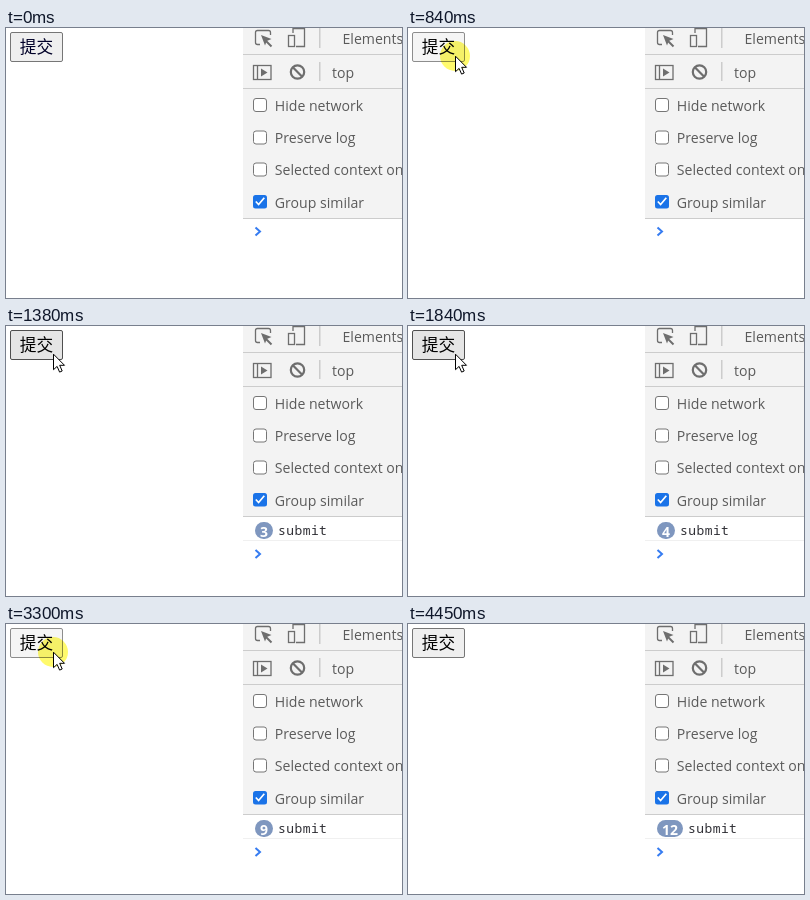
Write an HTML page that moves like this. It is 396 px wide and 270 px high and loops after 4920 ms.

```html
<!DOCTYPE html>
<html lang="zh">
<head>
<meta charset="utf-8">
<title>Submit counter</title>
<style>
  html, body { margin: 0; width: 100%; height: 100%; overflow: hidden; background: #fff; }
  svg { display: block; }
  .ui { font: 14.1px "Open Sans", "Noto Sans", sans-serif; fill: #5a5a5a; }
  .rule { fill: #ccc; }
  .line { fill: none; stroke: #6e6e6e; stroke-width: 1.3; }
  .solid { fill: #6e6e6e; }
  .box { fill: #fff; stroke: #767676; }
  .button rect { fill: #efefef; stroke: #767676; }
  .button text { font: 300 16.7px "Noto Sans CJK SC", "Noto Sans CJK", sans-serif; fill: #000; }
  .idle text { fill: #000028; }
  .hover rect { fill: #e5e5e5; stroke: #4f4f4f; }
  .down rect { fill: #f5f5f5; stroke: #8d8d8d; }
  .badge rect { fill: #7f97bf; }
  .badge text { font: bold 14px "Open Sans", "Noto Sans", sans-serif; fill: #fff; text-anchor: middle; }
  #word { font: 13px "Noto Sans Mono", "DejaVu Sans Mono", monospace; letter-spacing: .42px; fill: #303036; }
  #prompt { fill: none; stroke: #367cf1; stroke-width: 2; }
  #glow { fill: #fffa6c; mix-blend-mode: multiply; }
</style>
</head>
<body>
<svg width="396" height="270" viewBox="0 0 396 270">
  <rect width="396" height="270" fill="#fff"/>

  <g id="button" class="button">
    <rect x="4.5" y="4.5" width="52" height="29" rx="1.5"/>
    <text x="13.8" y="25">提交</text>
  </g>

  <!-- developer tools panel -->
  <rect x="237" width="159" height="190" fill="#f3f3f3"/>
  <g class="rule">
    <rect x="237" y="26" width="159" height="1"/>
    <rect x="237" y="60" width="159" height="1"/>
    <rect x="237" y="190" width="159" height="1"/>
    <rect x="313" y="0" width="1.5" height="20"/>
    <rect x="313" y="34" width="1.5" height="19"/>
  </g>
  <g class="line">
    <path d="M254 16.5H251.5Q249.5 16.5 249.500 14.5V4.500Q249.500 2.500 251.500 2.500H262.500Q264.500 2.500 264.500 4.500V7"/>
    <path d="M259.500 12.500L265.500 18.500" stroke-width="2"/>
    <path d="M287 5V.5H298.500V18.500H290"/>
    <rect x="282.500" y="7.500" width="6" height="11"/>
    <rect x="247.500" y="37.500" width="17.500" height="14"/>
    <path d="M251.500 38V51"/>
    <circle cx="291.500" cy="44" r="6.700" stroke-width="2.200"/>
    <path d="M286.800 39.300L296.200 48.700" stroke-width="2.200"/>
  </g>
  <path class="solid" d="M255 7L265.500 11L260.800 13L259 17.500Z"/>
  <path class="solid" d="M255 40.500L261.500 44.500L255 48.500Z"/>
  <g class="ui">
    <text x="336.500" y="16">Elements</text>
    <text x="326" y="50">top</text>
    <text x="268.800" y="83">Hide network</text>
    <text x="268.800" y="115">Preserve log</text>
    <text x="268.800" y="147">Selected context only</text>
    <text x="268.800" y="180">Group similar</text>
  </g>
  <g class="box">
    <rect x="247.500" y="70.500" width="13" height="13" rx="2.500"/>
    <rect x="247.500" y="103" width="13" height="13" rx="2.500"/>
    <rect x="247.500" y="135" width="13" height="13" rx="2.500"/>
  </g>
  <rect x="247" y="167" width="14" height="13.500" rx="2.500" fill="#1a73e8"/>
  <path d="M249.800 173.500L252.600 176.500L258.300 169.800" fill="none" stroke="#fff" stroke-width="1.700"/>

  <!-- console -->
  <g id="log">
    <rect x="237" y="214" width="159" height="1" fill="#f0f0f0"/>
    <g id="badge" class="badge">
      <rect id="pill" x="249" y="196" height="17" rx="8.500"/>
      <text id="count" y="210.500"></text>
    </g>
    <text id="word" y="209">submit</text>
  </g>
  <path id="prompt" d="M249.500 199.500L254 203.500L249.500 207.500"/>

  <circle id="glow" cx="47" cy="28" r="15"/>
  <path id="cursor" d="M.5 .7V16.200L4.100 12.900L6.600 18.600L9.200 17.500L6.700 11.800H11.500Z"
        fill="#fff" stroke="#000"/>
</svg>
<script>
  const LOOP = 4920;
  const HOVER = 600, LEAVE = 4140, GONE = 4450;
  const presses = [[840, 900], [1070, 1140], [1300, 1380], [1760, 1840],
                   [1990, 2070], [2300, 2450], [2530, 3990]];
  const logs = [900, 1140, 1380, 1840, 2070, 2450, 2760, 3070, 3300, 3530, 3760, 3990];

  const el = id => document.getElementById(id);
  const [button, log, badge, pill, count, word, prompt, glow, cursor] =
    ["button", "log", "badge", "pill", "count", "word", "prompt", "glow", "cursor"].map(el);
  const show = (node, on) => node.setAttribute("visibility", on ? "inherit" : "hidden");
  const move = (node, x, y) => node.setAttribute("transform", `translate(${x} ${y})`);
  const curve = (a, b, c, u) => (1 - u) ** 2 * a + 2 * u * (1 - u) * b + u * u * c;

  // The pointer moves in coarse steps of about 75 ms.
  function pointer(t) {
    if (t < 70 || t >= GONE) return null;
    if (t < HOVER) {
      const u = Math.min(6, Math.floor((t - 70) / 75)) / 6;
      return [curve(289, 90, 52, u), curve(195, 115, 35, u)];
    }
    if (t < 670) return [49, 30];
    if (t < LEAVE) return [47, 27.5];
    const u = (Math.min(4, 1 + Math.floor((t - LEAVE) / 77)) / 4) ** 2;
    return [47 + 339 * u, 27.5 + 224.5 * u];
  }

  function draw(t) {
    const at = pointer(t);
    show(cursor, at);
    if (at) move(cursor, ...at);

    const down = presses.some(([from, to]) => t >= from && t < to);
    const state = down ? "down" : t < HOVER ? "idle" : t < LEAVE ? "hover" : "";
    button.setAttribute("class", "button " + state);
    show(glow, down);

    const n = logs.filter(time => time <= t).length;
    const width = n > 9 ? 26 : 18;
    show(log, n > 0);
    show(badge, n > 1);
    pill.setAttribute("width", width);
    count.setAttribute("x", 249 + width / 2);
    count.textContent = n;
    word.setAttribute("x", n > 1 ? 254 + width : 266);
    move(prompt, 0, n ? 24.5 : 0);
  }

  const start = performance.now();
  function tick() {
    draw((performance.now() - start) % LOOP);
    requestAnimationFrame(tick);
  }
  tick();
</script>
</body>
</html>
```
